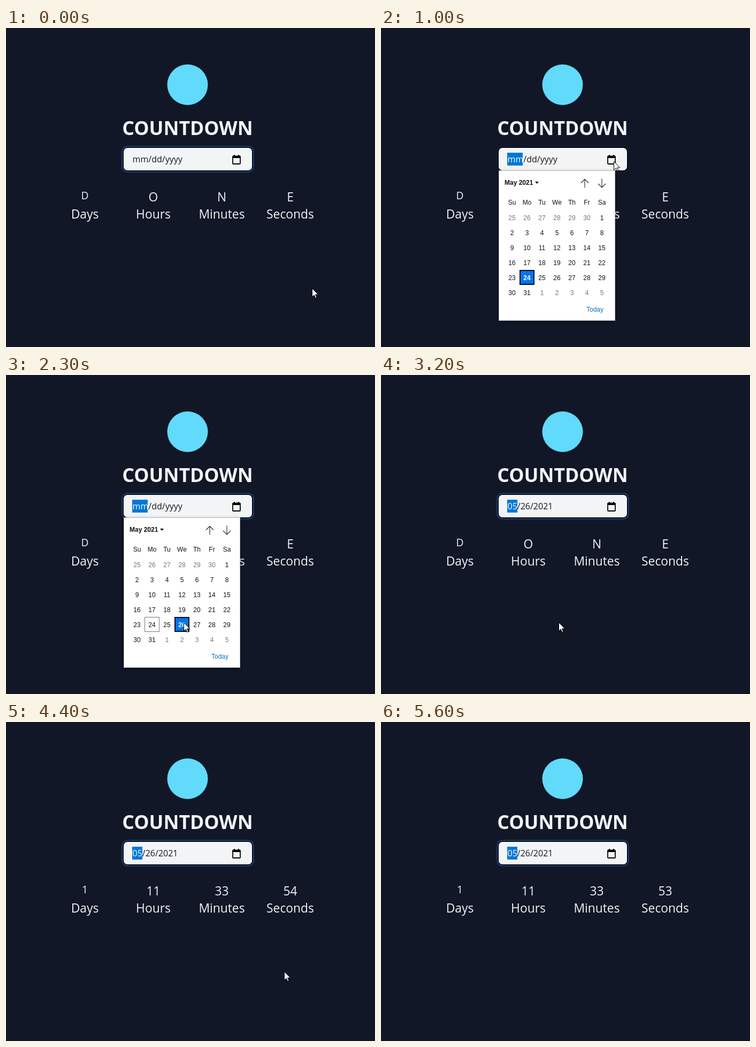
These frames come from a looping animation (690 by 596 pixels, 5700 ms). An HTML page:

```html
<!DOCTYPE html>
<html lang="en">
<head>
<meta charset="utf-8">
<title>Countdown</title>
<style>
  html, body { margin: 0; width: 690px; height: 596px; overflow: hidden; background: #111727; }
  svg { display: block; }
  .ui { font-family: "Open Sans", "Noto Sans", sans-serif; fill: #f3f4f6; }
  .mid { text-anchor: middle; }
  .title { font-size: 35.6px; font-weight: 700; }
  .label { font-size: 22.8px; }
  .small { font-size: 19.2px; }
  .field { font-size: 16px; fill: #16181d; white-space: pre; }
  .picker { font: 12px "Liberation Sans", Arial, sans-serif; fill: #101010; }
  .bold { font-weight: 700; }
  .dim { fill: #767676; }
  .link { fill: #0b72c4; }
  .shadow { filter: drop-shadow(0 2px 3px rgba(0, 0, 0, .35)); }
  .cell { fill: none; }
  .hover { fill: #b3d3fa; }
  .today { stroke: #767676; }
  .selected { fill: #0075f2; stroke: #0b0f18; stroke-width: 2px; }
  .selected + text { fill: #fff; font-weight: 700; }
</style>
</head>
<body>
<svg id="stage" width="690" height="596" viewBox="0 0 690 596"></svg>
<script>
const LOOP = 5700, STEP = 100;
const OPEN = 800, PICK = 2200, CLOSE = 2400;
const FIRST_TICK = 3350, TICK = 1050;
const DEADLINE = ((24 + 11) * 60 + 33) * 60 + 55;
const CELL = 28, GRID_X = 231, GRID_Y = 340, TODAY = 24, CHOSEN = 26;

// Pointer stops: time, x, y; it eases from one to the next
const STOPS = [
  [0, 572, 486], [800, 435, 249], [1200, 435, 249], [1800, 314.5, 466], [2300, 332, 462],
  [3500, 332, 462], [4000, 541, 475], [4400, 520, 466], [4800, 531, 453], [5500, 200, -40]
];

const stage = document.getElementById("stage");

function add(parent, tag, attrs = {}, text = "") {
  const node = document.createElementNS("http://www.w3.org/2000/svg", tag);
  for (const key in attrs) node.setAttribute(key, attrs[key]);
  node.textContent = text;
  parent.append(node);
  return node;
}
const rect = (parent, x, y, width, height, fill, more) =>
  add(parent, "rect", { x, y, width, height, fill, ...more });
const write = (parent, x, y, cls, text) => add(parent, "text", { x, y, class: cls }, text);
const show = (node, on) => node.setAttribute("visibility", on ? "visible" : "hidden");

// Page
rect(stage, 0, 0, 690, 596, "#111727");
rect(stage, 0, 595, 690, 1, "#0a0f1c");
add(stage, "circle", { cx: 339.5, cy: 106, r: 38, fill: "#61dafb" });
write(stage, 339.5, 199.5, "ui title mid", "COUNTDOWN");

const values = ["Days", "Hours", "Minutes", "Seconds"].map((name, i) => {
  const x = 147.5 + 128 * i;
  write(stage, x, 356, "ui label mid", name);
  return write(stage, x, i ? 324 : 320, "ui mid " + (i ? "label" : "small"), "");
});

// Date field: the box with two rings around it
const layer = (grow, fill) =>
  rect(stage, 220 - grow, 224 - grow, 240 + 2 * grow, 42 + 2 * grow, fill, { rx: 7 + grow });
const ring = layer(3.5, "#264a8c");
layer(2, "#030712");
layer(0, "#f3f4f6");
const mark = rect(stage, 236, 233, 29, 24, "#0078d7");
const date = write(stage, 236.5, 251, "ui field", "");
const head = add(date, "tspan");
const tail = add(date, "tspan");
rect(stage, 424, 239.5, 14, 14.5, "none", { stroke: "#000", "stroke-width": 1.8, rx: 1 });
rect(stage, 423.5, 239, 15, 4, "#000", { rx: 1 });
for (const x of [426, 434]) rect(stage, x, 237, 2, 3, "#000");

// Calendar
const picker = add(stage, "g", { class: "picker" });
rect(picker, 220.5, 266.5, 217, 280, "#fff", { stroke: "#b8b8b8", class: "shadow" });
write(picker, 231, 293, "bold", "May 2021");
add(picker, "path", { d: "M288 287h7l-3.5 4z" });
add(picker, "path", {
  d: "M381 298.5V282.5M374 289.5l7-7 7 7M413 281.5V298M406 291l7 7 7-7",
  fill: "none", stroke: "#222", "stroke-width": 1.1
});
["Su", "Mo", "Tu", "We", "Th", "Fr", "Sa"].forEach((day, i) =>
  write(picker, 245 + CELL * i, 330, "mid", day));

const cells = Array.from({ length: 42 }, (_, i) => {
  const x = GRID_X + CELL * (i % 7), y = GRID_Y + CELL * Math.floor(i / 7);
  const day = i - 5, inMonth = day >= 1 && day <= 31;
  const box = add(picker, "rect", { class: "cell" });
  write(picker, x + 14, y + 19, inMonth ? "mid" : "mid dim", new Date(2021, 4, day).getDate());
  return { x, y, day, box };
});
write(picker, 384, 530, "link", "Today");

const pointer = add(stage, "path", {
  d: "M.5 .5V16.5L4.2 13 6.7 18.5 9 17.5 6.6 12H11.7Z",
  fill: "#fff", stroke: "#000", "stroke-linejoin": "round"
});

function pointerAt(t) {
  const next = STOPS.findIndex(stop => stop[0] > t);
  if (next < 0) return STOPS[STOPS.length - 1].slice(1);
  const [t0, x0, y0] = STOPS[next - 1], [t1, x1, y1] = STOPS[next];
  const k = (t - t0) / (t1 - t0), ease = k * k * (3 - 2 * k);
  return [x0 + (x1 - x0) * ease, y0 + (y1 - y0) * ease];
}

function countdownAt(t) {
  if (t < FIRST_TICK) return [..."DONE"];
  const left = DEADLINE - Math.floor((t - FIRST_TICK) / TICK);
  return [left / 86400, left / 3600 % 24, left / 60 % 60, left % 60].map(Math.floor);
}

function paintCell({ x, y, box }, look) {
  const inset = { selected: 1, today: 0.5 }[look] || 0, size = CELL - 2 * inset;
  const attrs = { x: x + inset, y: y + inset, width: size, height: size, class: "cell " + look };
  for (const key in attrs) box.setAttribute(key, attrs[key]);
}

function drawPicker(t, px, py) {
  const open = t >= OPEN && t < CLOSE;
  show(picker, open);
  if (!open) return;
  const selected = t < PICK ? TODAY : CHOSEN;
  for (const cell of cells) {
    const dx = px - cell.x, dy = py - cell.y;
    const over = dx >= 0 && dx < CELL && dy >= 0 && dy < CELL;
    paintCell(cell, cell.day === selected ? "selected"
      : cell.day === TODAY ? "today" : over ? "hover" : "");
  }
}

function draw(t) {
  const [px, py] = pointerAt(t);
  pointer.setAttribute("transform", `translate(${px} ${py})`);

  const parts = countdownAt(t);
  values.forEach((node, i) => { node.textContent = parts[i]; });

  const filled = t >= CLOSE, focused = t >= OPEN;
  head.textContent = filled ? "05" : "mm";
  tail.textContent = filled ? "/26/2021" : "/dd/yyyy";
  head.style.fill = focused ? "#fff" : "";
  mark.setAttribute("width", filled ? 19 : 29);
  show(mark, focused);
  ring.setAttribute("opacity", t >= 900 && t < 1200 ? 0.15 : 1);
  drawPicker(t, px, py);
}

const start = performance.now();
function frame() {
  const t = (performance.now() - start) % LOOP;
  draw(Math.floor(t / STEP) * STEP);
  requestAnimationFrame(frame);
}
frame();
</script>
</body>
</html>
```
